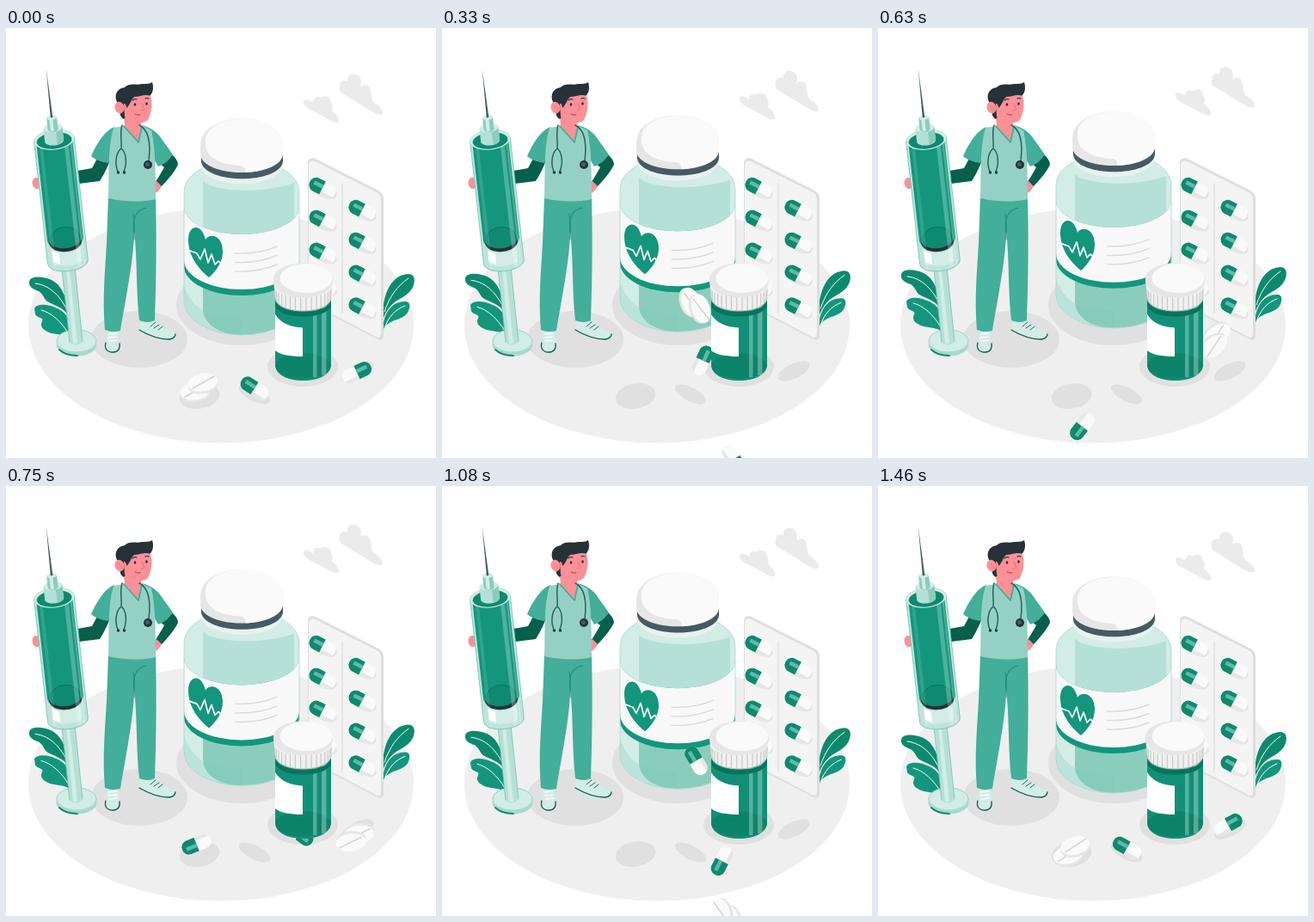
Write an HTML page with a canvas that moves like this. It is 500 px wide and 500 px high and loops after 1500 ms.

```html
<!DOCTYPE html>
<html lang="en">
<head>
<meta charset="utf-8">
<title>Medicine</title>
<style>
html, body { margin: 0; width: 100%; height: 100%; overflow: hidden; background: #fff; }
canvas { display: block; width: 100vw; height: 100vh; }
</style>
</head>
<body>
<canvas id="stage" width="500" height="500"></canvas>
<script>
const ctx = document.getElementById('stage').getContext('2d');
const LOOP = 1500, STEPS = 36, CYCLE = 35.4, TAU = Math.PI * 2;
const PIVOT = { x: 315, y: 411 };
const rad = deg => deg * Math.PI / 180;

const C = {
  green: '#13967c', deep: '#0d8a6e', mid: '#43ae99', soft: '#8bcdbd', shirt: '#94d1c4',
  pale: '#b5e0d7', mint: '#d2ece6', dark: '#085f4b', ink: '#263238', slate: '#455a64',
  skin: '#fc9097', floor: '#efefef', shadow: '#e0e0e0', white: '#fafafa', grey: '#e6e6e6',
  cloud: '#ebebeb'
};

function fill(d, color) {
  ctx.fillStyle = color;
  ctx.fill(new Path2D(d));
}

function line(d, color, width = 1) {
  ctx.strokeStyle = color;
  ctx.lineWidth = width;
  ctx.lineCap = ctx.lineJoin = 'round';
  ctx.stroke(new Path2D(d));
}

function oval(x, y, rx, ry, color, deg = 0) {
  ctx.beginPath();
  ctx.ellipse(x, y, rx, ry, rad(deg), 0, TAU);
  ctx.fillStyle = color;
  ctx.fill();
}

function ring(x, y, rx, ry, color, width = 1) {
  ctx.beginPath();
  ctx.ellipse(x, y, rx, ry, 0, 0, TAU);
  ctx.strokeStyle = color;
  ctx.lineWidth = width;
  ctx.stroke();
}

function group(x, y, deg, draw) {
  ctx.save();
  ctx.translate(x, y);
  ctx.rotate(rad(deg));
  draw();
  ctx.restore();
}

function box(x, y, w, h, color) {
  ctx.fillStyle = color;
  ctx.fillRect(x, y, w, h);
}

function clipped(d, draw) {
  ctx.save();
  ctx.clip(new Path2D(d));
  draw();
  ctx.restore();
}

// Capsule with its green half pointing along deg; side picks the lit flank.
function capsule(x, y, deg, length = 36, width = 17, side = 1) {
  group(x, y, deg, () => {
    ctx.scale(1, side);
    const h = length / 2, r = width / 2;
    ctx.beginPath();
    ctx.roundRect(-h, -r, length, width, r);
    ctx.clip();
    box(-h, -r, length, width, C.white);
    box(-h, -r, h, width * 0.25, C.grey);
    box(0, -r, h, width, C.deep);
    box(0, -r * 0.1, h - 5, width * 0.26, '#62b9a6');
  });
}

function tablet(x, y) {
  oval(x, y + 3, 17.5, 10.5, C.grey, -10);
  oval(x, y, 17.5, 10.5, C.white, -10);
  line(`M${x - 12} ${y + 7}L${x + 13} ${y - 7}`, '#d4d4d4', 1.5);
}

function ground() {
  oval(250, 346, 224, 136.5, C.floor);
  oval(155, 362, 56, 33, C.shadow);
  oval(274, 322, 76, 47, C.shadow);
  oval(345, 394, 41, 23, C.shadow);
  oval(225, 428, 23.5, 14.5, C.shadow, -10);
  oval(289, 426, 20, 8, C.shadow, 27);
  oval(409, 399, 20, 8.5, C.shadow, -26);
}

function clouds() {
  fill('M388 67C388 62 393 60 397 62C396 55 402 52 407 54C413 56 414 63 412 68C417 64 423 66 424 73C425 79 424 82 428 87C432 88 439 95 438 99C437 102 432 101 427 98L391 76C387 73 387 70 388 67Z', C.cloud);
  fill('M346 84C349 82 354 84 357 87C357 82 361 79 366 81C370 78 377 79 378 86C380 89 380 93 379 96C384 100 388 105 387 109C384 112 377 107 371 104L350 93C347 90 345 87 346 84Z', C.cloud);
}

function leaves() {
  fill('M27 295C28 288 42 288 53 293C64 299 70 310 74 336C66 324 57 323 48 318C44 315 44 310 38 306C32 304 26 301 27 295Z', C.deep);
  line('M34 297C52 299 64 313 72 330', C.white);
  fill('M33 326C36 320 50 321 57 325C66 328 72 335 74 342V361C66 355 58 357 50 354C43 351 39 347 42 341C45 337 36 337 34 333Z', C.green);
  line('M41 328C53 331 65 342 73 356', C.white);
  fill('M438 340C437 315 445 288 467 286C475 286 476 292 474 299C470 310 460 313 453 318C445 324 441 331 438 340Z', C.deep);
  line('M440 330C446 312 455 300 468 291', C.white);
  fill('M438 354C438 335 446 318 464 318C471 318 470 325 467 331C461 340 448 338 440 348Z', C.green);
  line('M440 350C444 336 453 327 464 323', C.white);
}

function blister() {
  fill('M351 158C351 152 355 150 360 152L433 189C438 192 439 195 439 200V357C439 362 436 364 432 362L351 320Z', '#dedede');
  fill('M352 160C352 155 355 153 359 155L431 191C435 193 436 196 436 200V354C436 359 434 361 430 359L352 318Z', '#f4f4f4');
  line('M391 181V332', C.shadow, 1.3);
  for (let i = 0; i < 4; i++) {
    for (const [x, y] of [[368, 186], [414, 212]]) {
      const cy = y + i * 37.8;
      oval(x + 1, cy + 2, 17, 8.5, '#e3e3e3', 27);
      capsule(x, cy, 207, 33, 17);
    }
  }
}

function bigBottle() {
  const body = 'M228 163C216 170 207 178 207 192V318A67 39 0 0 0 341 318V192C341 178 332 170 320 163Z';
  fill(body, C.mint);
  clipped(body, () => {
    fill('M229 178C245 192 305 192 335 180V245H229Z', C.pale);
    fill('M229 290H341V357H274C251 357 229 346 229 326Z', C.soft);
    box(314, 290, 27, 67, '#b0ddd3');
    fill('M207 300C218 326 230 336 274 336V357H207Z', 'rgba(120,200,185,.25)');
    fill('M207 208A67 32 0 0 0 341 208V277A67 34 0 0 1 207 277Z', C.green);
    fill('M207 208A67 32 0 0 0 341 208V270A67 34 0 0 1 207 270Z', '#f8f8f8');
  });
  line(body, '#a8d9ce', 0.8);

  fill('M236 290C223 279 212 265 212 246C212 229 227 226 232 246C237 238 252 241 252 260C252 272 244 283 236 290Z', C.green);
  line('M214 259L222 262L226 269L231 257L235 273L239 263L243 275L247 271L251 275', '#fff', 1.7);
  for (let i = 0; i < 3; i++) {
    const y = 262 + i * 10.5;
    line(`M267 ${y}Q294 ${y + 1} 315 ${y - 8}`, '#dadada', 1.4);
  }

  fill('M226 150V158C228 189 320 189 322 158V150Z', '#e9f1ef');
  fill('M227 143V155C230 182 319 182 322 155V143Z', C.slate);
  fill('M226 137C226 95 322 95 322 137V147C319 175 229 175 226 147Z', C.grey);
  fill('M232 130C234 97 322 96 322 137V147C319 159 300 167 279 168C278 165 279 163 274 160C246 159 230 149 232 130Z', C.white);
}

function smallBottle() {
  const body = 'M313 310V391C313 403 327 410 345.500 410S378 403 378 391V310Z';
  fill(body, '#119077');
  clipped(body, () => {
    oval(345.5, 393, 32.5, 15, '#0c846a');
    box(357, 310, 4.5, 96, 'rgba(255,255,255,.3)');
    box(367, 310, 5.5, 94, 'rgba(255,255,255,.3)');
    fill('M313 316C315 335 376 335 378 316V322C375 340 316 340 313 322Z', '#08745b');
  });
  fill('M313 333C319 343 331 348 345 348.500V382C331 382 319 380 313 375Z', '#fff');

  const cap = 'M311 293C311 267 380 267 380 293L378 314C376 334 315 334 313 314Z';
  fill(cap, '#f0f0f0');
  clipped(cap, () => {
    for (let i = 0; i < 16; i++) {
      const a = rad(8 + i * 11), x = 345.5 - 33 * Math.cos(a), y = 303 + 10 * Math.sin(a);
      line(`M${x} ${y}V${y + 17}`, '#c9c9c9', 1.2);
    }
  });
  line('M313 314C315 334 376 334 378 314', '#c4c4c4', 1);
  fill('M311 293C311 267 380 267 380 293C380 320 311 320 311 293Z', C.grey);
  oval(349, 291, 30.5, 17, C.white);
}

function syringe() {
  oval(82, 368, 23.5, 13.5, '#a5d9cd');
  line('M62 374C67 379 75 381 83 381', C.deep, 1.8);
  oval(82, 364, 23.5, 13.5, C.mint);
  ring(82, 364, 23, 13, '#8fcfc0', 0.8);
  fill('M65 278L74 365C77 370 86 369 89 364L80 276Z', '#b5e0d7');
  fill('M70 280L78 367L83 367L74 280Z', C.mint);
  line('M65 280L74 365M80 278L89 364', '#75c2b1', 0.8);

  group(56, 130, -6.4, () => {
    const barrel = 'M-23.500 0V143C-22 157 22 157 23.500 143V0C22 -15 -22 -15 -23.500 0Z';
    fill(barrel, '#bce4dc');
    clipped(barrel, () => {
      fill('M-21 2V116C-20 131 20 131 21 116V2Z', C.green);
      oval(0, 115, 17, 13, '#0e8a70');
      ring(0, 115, 17, 13, '#0a735b', 0.8);
      fill('M-19 117C-15 130 15 130 19 117V121C15 134 -15 134 -19 121Z', C.ink);
      fill('M-17 126C-12 134 12 134 17 126V143C12 149 -12 149 -17 143Z', C.mint);
      fill('M-17 128L-9 132V145L-17 141Z', '#fff');
      box(-18, 0, 4, 150, 'rgba(255,255,255,.12)');
      box(11, 0, 5, 150, 'rgba(255,255,255,.25)');
      box(18, 0, 2, 150, 'rgba(255,255,255,.25)');
    });
    line(barrel, '#73c2b0', 0.8);
    oval(0, 0, 23.5, 11.5, C.mint);
    oval(0, 1, 20.5, 9.5, C.deep);
    fill('M-11 -14V2C-8 8 8 8 11 2V-14Z', C.pale);
    fill('M3 -14V6C7 6 10 4 11 2V-14Z', C.soft);
    oval(0, -14, 11, 5, C.mint);
    fill('M-6 -26V-12C-4 -8 4 -8 6 -12V-26Z', C.soft);
    fill('M-3 -26V-10H1V-26Z', C.mint);
    oval(0, -26, 6, 3, C.mint);
    fill('M0 -83L-1.300 -26H1.300Z', C.slate);
  });
}

function legs() {
  fill('M117 350L116 363C113 370 117 377 124 377C131 377 134 371 132 364L130 349Z', C.mint);
  line('M116 366C114 373 118 377 124 377S133 373 132 367', C.dark, 1.3);
  line('M119 356L129 355M119 360L129 359M120 364L129 363', C.white, 1.3);
  fill('M156 339L155 350C163 356 177 362 190 362C196 361 198 357 196 354C186 350 178 346 173 338Z', C.mint);
  line('M155 351C165 357 178 362 190 362C195 361 197 359 197 356', C.dark, 1.3);
  line('M168 347L174 342M172 349L178 345M177 351L182 347', C.dark, 0.9);
  fill('M119 195L174 194C175 235 175 290 173 340C167 343 160 342 155 340C151 306 153 270 149 236C149 266 140 310 133 352C126 354 120 353 115 351C112 315 115 285 117 250Z', C.mid);
  line('M149 238C147 222 150 212 163 209', '#228a74', 1.1);
  line('M148 216C150 228 149 238 149 246', '#228a74', 0.9);
}

function torso() {
  fill('M108 148L100 163L83 166L85 181L109 178C113 172 118 162 121 154Z', C.dark);
  fill('M190 145C196 149 200 154 200 159C195 169 186 179 178 187L173 180C178 173 181 167 184 162L174 154Z', C.dark);
  fill('M175 178L181 184C178 189 175 192 173 192V180Z', C.skin);
  fill('M126 115C115 119 105 135 99 149C105 154 112 156 119 157L128 135Z', C.mid);
  fill('M158 113C169 116 177 122 181 129C187 137 191 143 194 147C190 154 183 159 177 161L167 144Z', C.mid);
  fill('M125 116L138 114L154 132L159 114L169 119C174 139 174 172 174 199C157 203 135 202 119 198C120 171 118 139 125 116Z', C.shirt);
  fill('M136 95L138 114C143 121 149 127 154 132C157 126 158 119 157 108Z', C.skin);
  line('M137 114L154 133L158 115', C.mid, 1.8);
  line('M135 113C132 122 135 132 134 140C128 145 126 157 130 167M134 140C140 145 141 157 137 167', '#24665a', 1.5);
  line('M155 113C165 118 169 130 166 154', '#24665a', 1.5);
  oval(130.5, 168, 1.7, 1.7, C.ink);
  oval(137.5, 168, 1.7, 1.7, C.ink);
  oval(165, 159, 5, 5, C.ink);
  oval(164.5, 158.5, 2.6, 2.6, C.slate);
}

function head() {
  fill('M129 86C125 77 130 70 138 69C143 63 152 67 158 65C163 65 167 65 170 63C172 69 171 76 167 79L149 90L137 106C132 103 132 99 134 96Z', C.ink);
  fill('M137 88C143 88 145 82 149 80C156 80 162 76 168 79C171 87 169 100 165 107C158 113 147 110 138 103Z', C.skin);
  fill('M128 83C136 84 140 88 140 93C144 90 145 84 149 80L137 70Z', C.ink);
  oval(132, 92.5, 5.5, 6.8, C.skin, -18);
  line('M130 90C134 91 135 94 135 97', '#e77d78', 0.9);
  oval(150, 89, 1.3, 1.8, C.ink);
  oval(163.5, 88, 1.3, 1.8, C.ink);
  line('M147 84Q149 82 152 83M162 82Q164 81 166 82', C.ink, 1.2);
  line('M158 88L161 95L157 96', '#e5706e', 0.9);
  line('M150 100Q153 102 156 101', '#a84148', 1);
}

function doctor() {
  legs();
  torso();
  head();
  oval(35.5, 180.5, 5, 6.5, C.skin, -10);
}

function pills(turn) {
  group(PIVOT.x, PIVOT.y, turn, () => {
    capsule(-26, 8, 213);
    capsule(93, -10.5, -25, 36, 17, -1);
    tablet(-95, 11);
    tablet(-86, 1);
  });
}

function render(step) {
  const phase = step / CYCLE;
  const lift = -4.3 * (1 - Math.cos(TAU * phase));
  const floating = draw => group(0, lift, 0, draw);

  box(0, 0, 500, 500, '#fff');
  ground();
  floating(() => {
    clouds();
    leaves();
  });
  blister();
  floating(bigBottle);
  pills(phase * 360);
  smallBottle();
  doctor();
  syringe();
}

function tick() {
  const time = performance.now() % LOOP;
  render(Math.floor(time * STEPS / LOOP + 0.1) % STEPS);
  requestAnimationFrame(tick);
}
tick();
</script>
</body>
</html>
```
